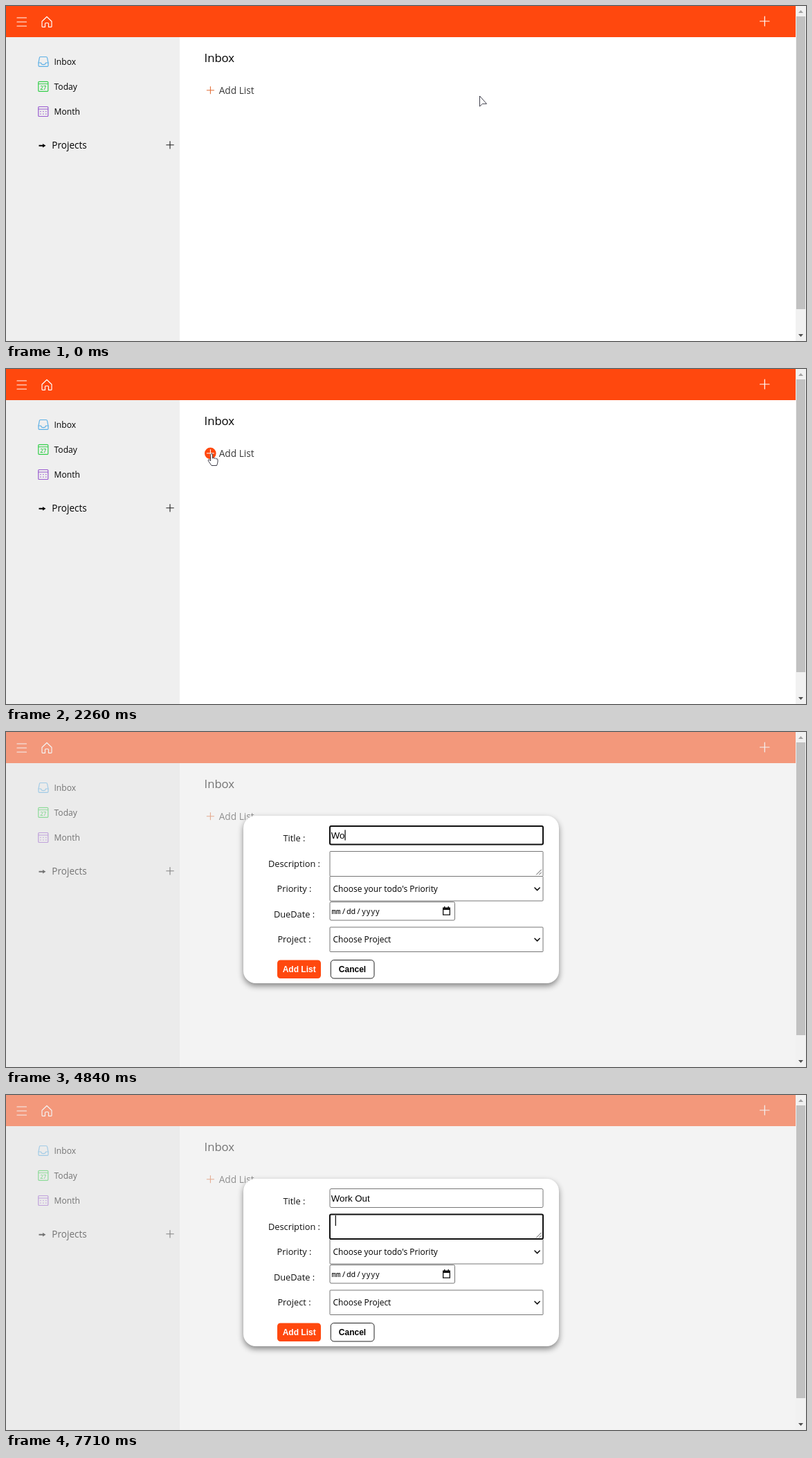
Write an HTML page that moves like this. It is 1156 px wide and 484 px high and loops after 8000 ms.

```html
<!DOCTYPE html>
<html lang="en">
<head>
<meta charset="utf-8">
<title>Todo list</title>
<style>
  html, body { margin: 0; width: 100%; height: 100%; overflow: hidden; background: #fff; }
  svg { display: block; width: 100%; height: 100%; }
  text { font-family: "Open Sans", sans-serif; white-space: pre; }
  .nav { font-size: 12.1px; font-weight: 500; }
  .label { font-size: 12.8px; text-anchor: middle; fill: #111; }
  .control { font: 12px "Liberation Sans", Arial, sans-serif; }
  .entry { font: 13.33px "Liberation Sans", Arial, sans-serif; }
  .button { font: bold 12px "Liberation Sans", Arial, sans-serif; text-anchor: middle; }
  .date { font: 11px "Noto Sans Mono", monospace; }
  .line { fill: none; stroke-linecap: round; stroke-linejoin: round; }
  .field { fill: #fff; stroke: #767676; }
  .ring { fill: none; stroke: #101010; stroke-width: 2; }
  .panel { filter: drop-shadow(0 4px 4px rgba(0, 0, 0, .45)); }
</style>
</head>
<body>
<svg viewBox="0 0 1156 484">
  <rect width="1156" height="484" fill="#fff"/>
  <rect y="45" width="251" height="439" fill="#efefef"/>
  <rect width="1141" height="45" fill="#ff480e"/>

  <g class="line" stroke="#fff" stroke-width="1.2">
    <path d="M16 17H29.500M16 23H29.500M16 29H29.500"/>
    <path d="M52 22.300L59 15.500L66 22.300V29.500Q66 30.300 65.200 30.300H61.500V25.500Q61.500 24.500 60.500 24.500H57.500Q56.500 24.500 56.500 25.500V30.300H52.800Q52 30.300 52 29.500Z"/>
    <path d="M1089.500 22H1103M1096.300 15.200V28.800"/>
  </g>

  <rect id="hover" x="39" y="67.500" width="174" height="26.500" rx="4" fill="#dfdfdf"/>
  <g class="line" stroke="#5db0e6" stroke-width="1.2">
    <path d="M49.500 73.500H58Q59.300 73.500 59.600 75L61 82V86Q61 87.300 59.700 87.300H48.300Q47 87.300 47 86V82L48.300 75Q48.500 73.500 49.500 73.500Z"/>
    <path d="M47 82H50.500Q51 84.700 54 84.700T57.500 82H61"/>
  </g>
  <g class="line" stroke="#35cf4b" stroke-width="1.2">
    <rect x="46.800" y="109.300" width="14" height="14" rx="1"/>
    <path d="M47 112.500H60.500"/>
  </g>
  <text x="53.800" y="121.300" font-size="8" font-weight="600" text-anchor="middle" fill="#35cf4b">27</text>
  <g class="line" stroke="#9a5cd0" stroke-width="1.2">
    <rect x="46.800" y="145.500" width="14" height="14" rx="1"/>
    <path d="M47 149H60.500"/>
    <path d="M50 152.500H58M50 156H58" stroke-width="1.600" stroke-dasharray="0 3.900"/>
  </g>
  <g class="nav">
    <text x="69.500" y="85">Inbox</text>
    <text x="69.500" y="121">Today</text>
    <text x="69.500" y="157">Month</text>
  </g>
  <path d="M47.500 200.800H53V199L57.500 201.800L53 204.400V202.800H47.500Z"/>
  <text x="66.300" y="206" font-size="13.600" font-weight="500">Projects</text>
  <path class="line" d="M231.800 200.800H242.300M237 195.500V206" stroke="#222" stroke-width="1.1"/>

  <text x="286.500" y="81" font-size="16.700" font-weight="500">Inbox</text>
  <circle id="disc" cx="295.300" cy="121.900" r="8.300" fill="#ff480e"/>
  <path id="plus" class="line" d="M290.300 121.700H300.500M295.400 116.600V126.800" stroke-width="1.1"/>
  <text x="307.700" y="127" font-size="13.700" font-weight="500" fill="#3c3c3c">Add List</text>

  <g id="modal">
    <rect width="1141" height="484" fill="#e8e8e8" opacity=".5"/>
    <rect class="panel" x="343" y="121" width="456" height="242" rx="18" fill="#fff"/>
    <g class="label">
      <text x="416.500" y="158">Title :</text>
      <text x="416.500" y="195">Description :</text>
      <text x="416.500" y="231">Priority :</text>
      <text x="416.500" y="268">DueDate :</text>
      <text x="416.500" y="304">Project :</text>
    </g>
    <g class="field">
      <rect x="468" y="135.500" width="308" height="27" rx="2"/>
      <rect x="468" y="208.500" width="308" height="35.500" rx="1"/>
      <rect x="468" y="172.500" width="308" height="36" rx="1"/>
      <rect x="468" y="245.500" width="180.500" height="26.500" rx="2"/>
      <rect x="468" y="282" width="308" height="35.500" rx="1"/>
    </g>
    <path class="line" d="M766.500 206L773.500 199M770.500 206L773.500 203" stroke="#555"/>
    <path class="line" d="M764 225L767.600 228.600L771.200 225M764 298.300L767.600 301.900L771.200 298.300" stroke="#111" stroke-width="1.6"/>
    <g class="control">
      <text x="472.500" y="230.500">Choose your todo's Priority</text>
      <text x="472.500" y="304">Choose Project</text>
    </g>
    <text class="date" y="263.300"><tspan x="470.500">mm</tspan><tspan x="484.700">/</tspan><tspan x="492">dd</tspan><tspan x="506.200">/</tspan><tspan x="513.700">yyyy</tspan></text>
    <path d="M631 253.500H633V252H634.500V253.500H638.500V252H640V253.500H642V264.800H631ZM632.300 257V263.500H640.700V257Z" fill="#111" fill-rule="evenodd"/>
    <rect x="392" y="329.500" width="63" height="26.500" rx="4.500" fill="#ff480e"/>
    <rect x="469.300" y="329.500" width="62.700" height="26.500" rx="4.500" fill="#fff" stroke="#222"/>
    <text class="button" x="423.700" y="346.500" fill="#fff">Add List</text>
    <text class="button" x="500.500" y="346.500">Cancel</text>
    <rect id="titleRing" class="ring" x="468" y="136" width="308" height="26.500" rx="2"/>
    <rect id="noteRing" class="ring" x="468" y="172.500" width="308" height="35.500" rx="2"/>
    <text id="entry" class="entry" x="469.700" y="153.500"></text>
    <rect id="caret" width="1.200" height="15"/>
  </g>

  <rect x="1141" width="15" height="484" fill="#f1f1f1"/>
  <rect x="1142" y="15" width="13" height="423" fill="#c1c1c1"/>
  <path d="M1145 10L1148.500 6L1152 10Z" fill="#a3a3a3"/>
  <path d="M1145 474L1148.500 478L1152 474Z" fill="#505050"/>

  <path id="cursor" fill="#fff" stroke="#2b2b38" stroke-width=".9" stroke-linejoin="round"/>
</svg>
<script>
const LOOP = 8000;
const TEXT = "Work Out";
const KEY_TIMES = [4760, 4840, 5020, 5090, 5410, 6320, 6490, 6640];
const OPEN = 2760, FOCUS_TITLE = 3470, FOCUS_NOTE = 7650;

const SHAPES = {
  arrow: "M0 0V15L4 11.300H10Z",
  hand: "M-1.400 1.200Q0 -.6 1.400 1.200V7Q2.800 5.600 4 7.200Q5.600 6.200 6.500 7.800Q8.600 7 9 9V12Q8.600 15 7.500 17.500H0L-4.800 10.600Q-5 8.400 -3 9L-1.400 10.800Z",
  beam: "M-2.500 -8H2.500M0 -8V8M-2.500 8H2.500",
  none: ""
};

// Pointer stops: time, x, y, shape. It jumps from stop to stop.
const STOPS = [
  [0, 684.5, 130, "arrow"], [200, 688, 135, "arrow"], [260, 691, 141, "arrow"], [310, 693, 146, "arrow"],
  [760, 335, 184, "arrow"],
  [1130, 184, 83, "hand"], [1200, 172, 84, "hand"],
  [1420, 168, 85, "hand"], [1510, 167, 86, "hand"], [1600, 170, 86, "hand"],
  [1830, 182, 86, "hand"], [1910, 204, 88, "hand"], [1990, 236, 96, "arrow"],
  [2060, 268, 109, "arrow"], [2140, 291, 119, "hand"], [2260, 297, 122, "hand"],
  [2830, 310, 125, "arrow"], [2910, 360, 134, "arrow"], [2990, 430, 143, "arrow"],
  [3080, 510, 148, "beam"], [3160, 560, 149, "beam"], [4760, 0, 0, "none"]
];

const el = id => document.getElementById(id);
const within = (t, from, to) => t >= from && t < to;
const show = (id, visible) => el(id).setAttribute("visibility", visible ? "visible" : "hidden");

function drawPointer(t) {
  const [, x, y, shape] = STOPS.filter(stop => stop[0] <= t).pop();
  el("cursor").setAttribute("d", SHAPES[shape]);
  el("cursor").setAttribute("transform", `translate(${x} ${y})`);
}

function drawForm(t) {
  const entry = el("entry");
  entry.textContent = TEXT.slice(0, KEY_TIMES.filter(key => key <= t).length);

  const inNote = t >= FOCUS_NOTE;
  const caretOn = within(t, FOCUS_TITLE, 3940) || within(t, 4450, 5910) || within(t, 6320, 7230) || inNote;
  const caretX = inNote ? 475.7 : 469.7 + (entry.textContent ? entry.getComputedTextLength() : 0);
  el("caret").setAttribute("x", caretX);
  el("caret").setAttribute("y", inNote ? 174 : 141.5);

  const open = t >= OPEN;
  el("modal").style.display = open ? "" : "none";
  show("titleRing", within(t, FOCUS_TITLE, FOCUS_NOTE));
  show("noteRing", inNote);
  show("caret", caretOn);
}

function draw(now) {
  const t = now % LOOP;
  const onPlus = within(t, 2140, OPEN);
  show("hover", within(t, 1130, 1990));
  show("disc", onPlus);
  el("plus").setAttribute("stroke", onPlus ? "#fff" : "#e2703a");
  drawForm(t);
  drawPointer(t);
}

const start = performance.now();
function tick() {
  draw(performance.now() - start);
  requestAnimationFrame(tick);
}
tick();
</script>
</body>
</html>
```
